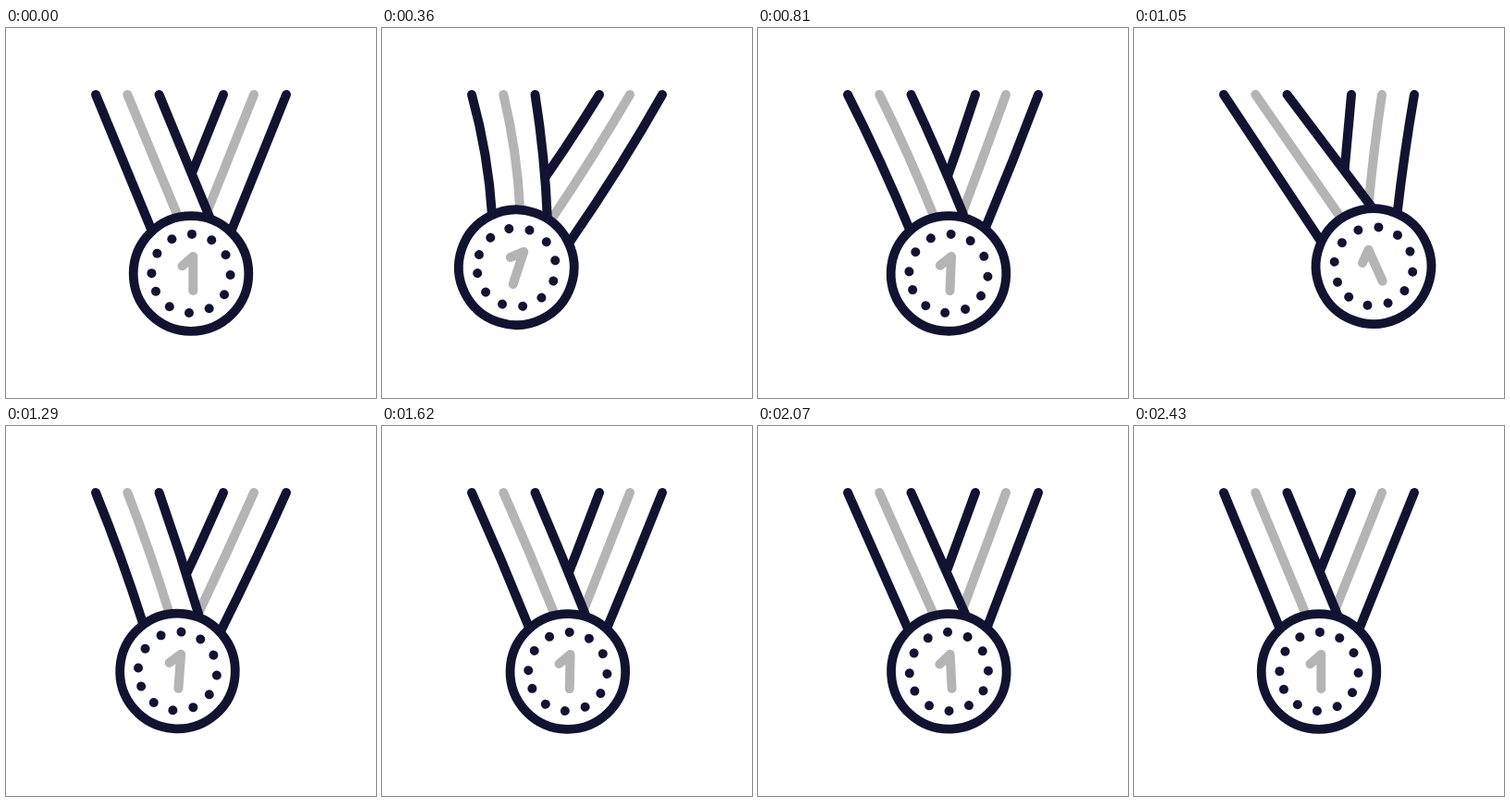
An HTML page with a canvas that plays this animation: 400x400 px, repeating every 5.09 s.

```html
<!DOCTYPE html>
<html lang="en">
<head>
<meta charset="utf-8">
<title>Swinging medal</title>
<style>
html, body { margin: 0; width: 100%; height: 100%; overflow: hidden; background: #fff; }
canvas { display: block; width: 400px; height: 400px; }
</style>
</head>
<body>
<canvas id="stage" width="400" height="400"></canvas>
<script>
const LOOP = 5090, STEP = 30;
const DARK = '#121331', GREY = '#b4b4b4';
const canvas = document.getElementById('stage');
const ctx = canvas.getContext('2d');
const scale = window.devicePixelRatio || 1;
canvas.width = canvas.height = 400 * scale;

// Keys: [time, value, ease x1, ease x2]; the ease leads into the key.
const SWAY = [[0, 0], [480, -59, .33, .42], [1005, 62.5, .625, .67], [1390, -30],
  [1810, 24], [2240, -3], [2430, 0]];
const TURN = [[0, 0], [520, 23.5], [1030, -24.5, .6, .67], [1410, 13],
  [1825, -10], [2240, 1], [2430, 0]];

// Band edges: tip x, then [end x, end y, bow] swung left, at rest, swung right.
const TIP_Y = 72;
const BANDS = {
  left: [97, [118.8, 202, 7], [158, 220, 0], [203.8, 233, 0]],
  leftMid: [131.3, [149, 196, 6], [186.2, 204.5, 0], [224.5, 206, 0]],
  leftInner: [165.5, [178.6, 206, 4], [220.3, 205, 0], [260, 197, 0]],
  rightInner: [235, [156, 190, 3], [183, 202, 0], [223.3, 202, 0]],
  rightMid: [268, [183.5, 206, 3], [214.5, 206, 0], [253.5, 195, -2]],
  right: [303, [203, 231, 5], [243.5, 219.5, 0], [285, 200, -2]]
};

// Cubic ease with flat ends, solved by bisection.
function ease(p, x1 = 1 / 3, x2 = 2 / 3) {
  let lo = 0, hi = 1;
  for (let i = 0; i < 24; i++) {
    const u = (lo + hi) / 2, v = 1 - u;
    if (3 * v * v * u * x1 + 3 * v * u * u * x2 + u * u * u < p) lo = u;
    else hi = u;
  }
  return lo * lo * (3 - 2 * lo);
}

const mix = (a, b, p) => a + (b - a) * p;

// The two key values around t and the eased progress between them.
function span(keys, t) {
  const i = keys.findIndex(k => k[0] > t);
  if (i < 0) return [0, 0, 0];
  const [t0, a] = keys[i - 1], [t1, b, x1, x2] = keys[i];
  return [a, b, ease((t - t0) / (t1 - t0), x1, x2)];
}

function pose(band, sway) {
  const [, left, rest, right] = band;
  const side = sway < 0 ? left : right;
  const amount = sway < 0 ? -sway / 55 : sway / 59.5;
  return rest.map((v, i) => mix(v, side[i], amount));
}

// Bands morph straight from one swung pose to the next.
function edgeAt(band, [from, to, p]) {
  const a = pose(band, from), b = pose(band, to);
  const [x, y, bow] = a.map((v, i) => mix(v, b[i], p));
  const tip = band[0];
  return { tip, x, y, mx: (tip + x) / 2 + bow, my: (TIP_Y + y) / 2 };
}

function stroke(path, color, width = 10) {
  ctx.strokeStyle = color;
  ctx.lineWidth = width;
  ctx.stroke(path);
}

function drawEdge(e, color) {
  const p = new Path2D();
  p.moveTo(e.tip, TIP_Y);
  p.quadraticCurveTo(e.mx, e.my, e.x, e.y);
  stroke(p, color);
}

function fillBetween(a, b) {
  ctx.beginPath();
  ctx.moveTo(a.tip, TIP_Y);
  ctx.quadraticCurveTo(a.mx, a.my, a.x, a.y);
  ctx.lineTo(b.x, b.y);
  ctx.quadraticCurveTo(b.mx, b.my, b.tip, TIP_Y);
  ctx.fillStyle = '#fff';
  ctx.fill();
}

function drawMedal(cx, cy, turn) {
  ctx.save();
  ctx.translate(cx, cy);
  ctx.rotate(turn);

  const ring = new Path2D();
  ring.arc(0, 0, 62.3, 0, 2 * Math.PI);
  ctx.fillStyle = '#fff';
  ctx.fill(ring);
  stroke(ring, DARK, 9.8);

  ctx.fillStyle = DARK;
  for (let k = 0; k < 12; k++) {
    const a = (180.5 + 30.25 * k) * Math.PI / 180;
    ctx.beginPath();
    ctx.arc(42.6 * Math.cos(a), 42.6 * Math.sin(a), 5, 0, 2 * Math.PI);
    ctx.fill();
  }

  stroke(new Path2D('M-9.5-8.3L2.3-18.5V18.5'), GREY);
  ctx.restore();
}

function draw(t) {
  const swing = span(SWAY, t);
  const sway = mix(...swing);
  const turn = mix(...span(TURN, t)) * Math.PI / 180;
  const edge = name => edgeAt(BANDS[name], swing);

  ctx.setTransform(scale, 0, 0, scale, 0, 0);
  ctx.fillStyle = '#fff';
  ctx.fillRect(0, 0, 400, 400);
  ctx.lineCap = ctx.lineJoin = 'round';

  drawEdge(edge('rightMid'), GREY);
  drawEdge(edge('rightInner'), DARK);
  drawEdge(edge('right'), DARK);

  // The left band lies in front of the right one.
  const left = edge('left'), leftInner = edge('leftInner');
  fillBetween(left, leftInner);
  drawEdge(edge('leftMid'), GREY);
  drawEdge(left, DARK);
  drawEdge(leftInner, DARK);

  drawMedal(200 + sway, 265.5 - sway * sway * .00225, turn);
}

const start = performance.now();
function frame() {
  const t = (performance.now() - start) % LOOP;
  draw(Math.floor(t / STEP) * STEP);
  requestAnimationFrame(frame);
}
frame();
</script>
</body>
</html>
```
